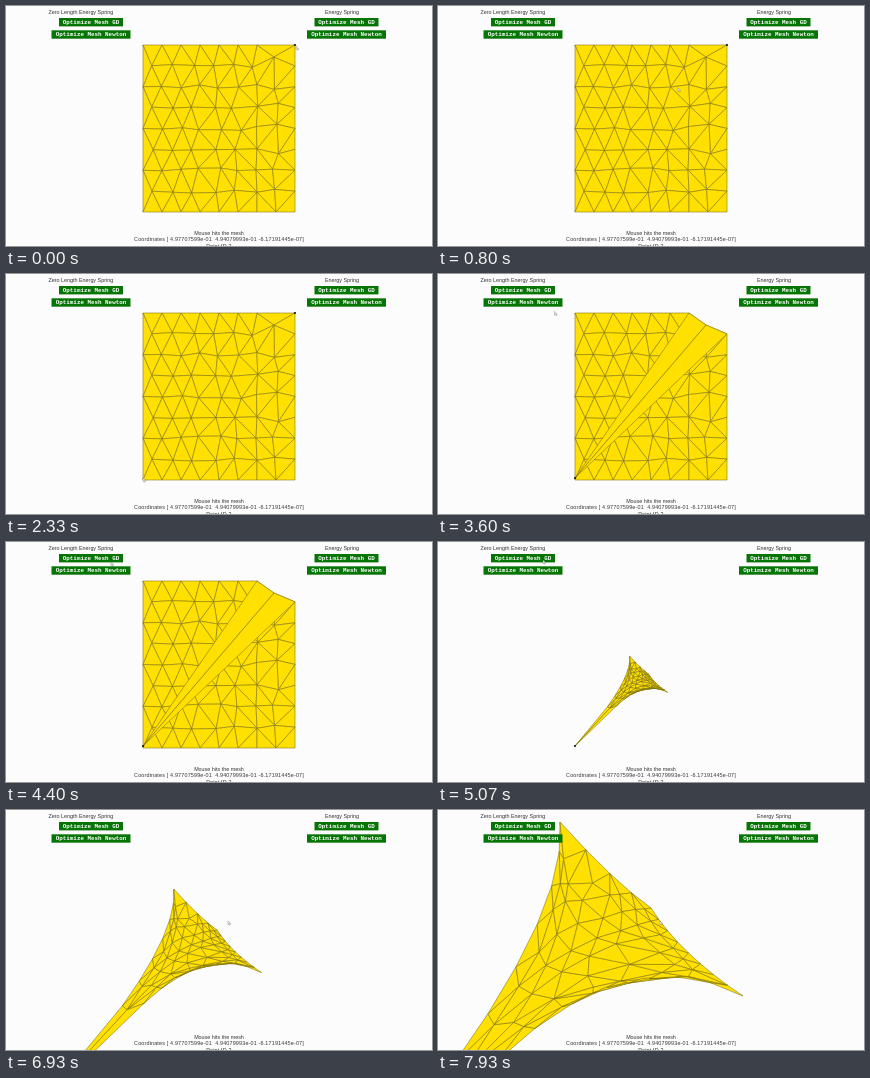
An HTML page that plays this animation: 426 px wide and 240 px high, repeating every 8 s.

```html
<!DOCTYPE html>
<html lang="en">
<head>
<meta charset="utf-8">
<title>Spring mesh</title>
<style>
html, body { margin: 0; width: 100%; height: 100%; overflow: hidden; background: #fcfcfc; }
svg { display: block; width: 100vw; height: 100vh; }
.note { font: 5.4px "Liberation Sans", Arial, sans-serif; fill: #333; text-anchor: middle; white-space: pre; }
.wide { letter-spacing: .175px; }
.btn text { font: bold 5.88px "Liberation Mono", monospace; fill: #fff; text-anchor: middle; }
.btn rect { fill: #067506; }
.face { fill: #ffe000; stroke: #ffe000; stroke-width: .3; stroke-linejoin: round; }
.edge { fill: none; stroke: #4a4420; stroke-width: .4; }
</style>
</head>
<body>
<svg viewBox="0 0 426 240">
  <g id="mesh"></g>
  <circle id="pin" r="1.1" fill="#111"/>
  <g id="ui"></g>
  <path id="cursor" d="M0 0V3.6L.9 2.8 1.6 4.2 2.2 3.9 1.6 2.6H2.7Z" fill="#fff" stroke="#555" stroke-width=".35"/>
</svg>
<script>
const LOOP = 8000, DROP = 2700, SOLVE = 4900;
const L = 137, T = 39, R = 289, B = 206, W = R - L, H = B - T;
const CENTER = [210, 141], ZOOM = 4.82;
const HELD = [137, 204];
const $ = id => document.getElementById(id);

function add(parent, tag, attrs, text) {
  const el = document.createElementNS('http://www.w3.org/2000/svg', tag);
  for (const key in attrs) el.setAttribute(key, attrs[key]);
  if (text) el.textContent = text;
  parent.appendChild(el);
  return el;
}

// Labels and buttons
function note(x, y, text, cls = '') {
  add($('ui'), 'text', { x, y, class: 'note ' + cls }, text);
}
function button(x, y, w, text) {
  const g = add($('ui'), 'g', { class: 'btn' });
  add(g, 'rect', { x: x - w / 2, y, width: w, height: 8.4 });
  add(g, 'text', { x, y: y + 6 }, text);
}
note(74.8, 8.2, 'Zero Length Energy Spring');
note(336, 8.2, 'Energy Spring');
for (const x of [85, 340.5]) {
  button(x, 12, 64, 'Optimize Mesh GD');
  button(x, 24.3, 79, 'Optimize Mesh Newton');
}
note(213, 228.6, 'Mouse hits the mesh');
note(213, 235.2, 'Coordinates [ 4.97707599e-01  4.94079993e-01 -6.17191445e-07]', 'wide');
note(213, 242, 'Point ID 2', 'wide');

let seed = 11;
const rand = () => (seed = seed * 16807 % 2147483647) / 2147483647;

// Staggered rows, regular at the left and looser to the right
const onBorder = ([x, y]) => x === L || x === R || y === T || y === B;
function buildPoints() {
  const out = [[R, T], [268, 51]]; // pinned corner and the node beside it
  for (let row = 0; row <= 8; row++) {
    const odd = row % 2, count = odd ? 7 : 8;
    const x0 = odd ? L + 9.5 : L;
    for (let i = 0; i <= count; i++) {
      const p = [x0 + (R - x0) * i / count, T + H * row / 8];
      if (Math.hypot(p[0] - R, p[1] - T) < 30 && p[0] < R || p[0] === R && row === 0) continue;
      const loose = 1 + 9 * (p[0] - L) / W;
      out.push(onBorder(p) ? p : p.map(v => v + (rand() - .5) * loose));
    }
  }
  return out;
}
const pts = buildPoints();

// Delaunay triangles by the empty circle test
function circle([ax, ay], [bx, by], [cx, cy]) {
  bx -= ax; by -= ay; cx -= ax; cy -= ay;
  const d = 2 * (bx * cy - by * cx);
  if (Math.abs(d) < 1) return null;
  const b = bx * bx + by * by, c = cx * cx + cy * cy;
  const x = (cy * b - by * c) / d, y = (bx * c - cx * b) / d;
  return { x: ax + x, y: ay + y, r2: x * x + y * y };
}
function triangulate(p) {
  const out = [];
  for (let i = 0; i < p.length; i++)
    for (let j = i + 1; j < p.length; j++) {
      if (Math.hypot(p[i][0] - p[j][0], p[i][1] - p[j][1]) > 45) continue;
      for (let k = j + 1; k < p.length; k++) {
        const c = circle(p[i], p[j], p[k]);
        if (!c || c.r2 > 1600) continue;
        if (p.every(([x, y]) => (x - c.x) ** 2 + (y - c.y) ** 2 > c.r2 - 1e-6)) out.push([i, j, k]);
      }
    }
  return out;
}
// Triangles at the pinned corner go last so they lie on top
const tris = triangulate(pts).sort((a, b) => (a[0] === 0) - (b[0] === 0));
const near = pts.map(() => new Set());
for (const t of tris) for (const a of t) for (const b of t) if (a !== b) near[a].add(b);

// Contracted mesh: border follows four arcs, the interior relaxes
const bezier = (a, b, c) => s =>
  [0, 1].map(i => (1 - s) ** 2 * a[i] + 2 * s * (1 - s) * b[i] + s * s * c[i]);
const tip = [122, 12], bump = [213, 98], end = [305, 186];
const topArc = bezier(tip, [130, 95], [15, 255]);
const leftArc = bezier(tip, [176, 72], bump);
const baseArc = bezier(bump, [242, 144], end);
const rightArc = bezier(end, [191, 126], [60, 250]);
const shrink = p => p.map((v, i) => CENTER[i] + (v - CENTER[i]) / ZOOM);

function contract() {
  const q = pts.map(([x, y], i) => {
    if (i === 0) return HELD;
    if (y === T) return shrink(topArc((x - L) / W * 4 / 3));
    if (x === L) return shrink(leftArc((y - T) / H));
    if (y === B) return shrink(baseArc((x - L) / W));
    if (x === R) return shrink(rightArc((B - y) / H * 8 / 7));
    return [205, 138];
  });
  const pull = pts.map(() => .3 + rand() * 1.7);
  for (let n = 0; n < 150; n++)
    pts.forEach((p, i) => {
      if (onBorder(p)) return;
      let x = 0, y = 0, sum = 0;
      for (const j of near[i]) {
        x += q[j][0] * pull[j];
        y += q[j][1] * pull[j];
        sum += pull[j];
      }
      q[i] = [x / sum, y / sum];
    });
  return q;
}
const dragged = [HELD, ...pts.slice(1)];
const solved = contract();

// Only edges shared by two triangles get a line
const shared = ([a, b]) => [...near[a]].filter(n => tris.some(t => [a, b, n].every(v => t.includes(v)))).length > 1;
const faces = tris.map(t => ({
  t,
  lines: [[t[0], t[1]], [t[1], t[2]], [t[2], t[0]]].filter(shared),
  fill: add($('mesh'), 'path', { class: 'face' }),
  edge: add($('mesh'), 'path', { class: 'edge' })
}));

const clamp = v => Math.max(0, Math.min(1, v));
const ease = v => v * v * (3 - 2 * v);

// Time, x, y of the pointer
const track = [
  [0, 290, 40], [350, 290, 40], [1500, 143, 163], [2200, 137, 204], [2800, 137, 204],
  [3600, 116.5, 37.5], [4300, 105, 20], [5100, 105, 18], [6100, 222, 111], [LOOP, 222, 111]
];
function pointer(t) {
  const i = track.findIndex(k => k[0] > t);
  const a = track[i - 1], b = track[i];
  const s = ease((t - a[0]) / (b[0] - a[0]));
  return [a[1] + (b[1] - a[1]) * s, a[2] + (b[2] - a[2]) * s];
}

function draw(t) {
  const pose = t < DROP ? pts : t < SOLVE ? dragged : solved;
  const k = ZOOM ** ease(clamp((t - 6200) / 1400));
  const view = pose.map(p => p.map((v, i) => (CENTER[i] + (v - CENTER[i]) * k).toFixed(2)));
  const path = ids => 'M' + ids.map(n => view[n]).join('L');
  for (const f of faces) {
    f.fill.setAttribute('d', path(f.t) + 'Z');
    f.edge.setAttribute('d', f.lines.map(path).join(''));
  }
  $('pin').setAttribute('cx', view[0][0]);
  $('pin').setAttribute('cy', view[0][1]);
  $('cursor').setAttribute('transform', `translate(${pointer(t)})`);
}

const start = performance.now();
function tick() {
  draw((performance.now() - start) % LOOP);
  requestAnimationFrame(tick);
}
tick();
</script>
</body>
</html>
```
